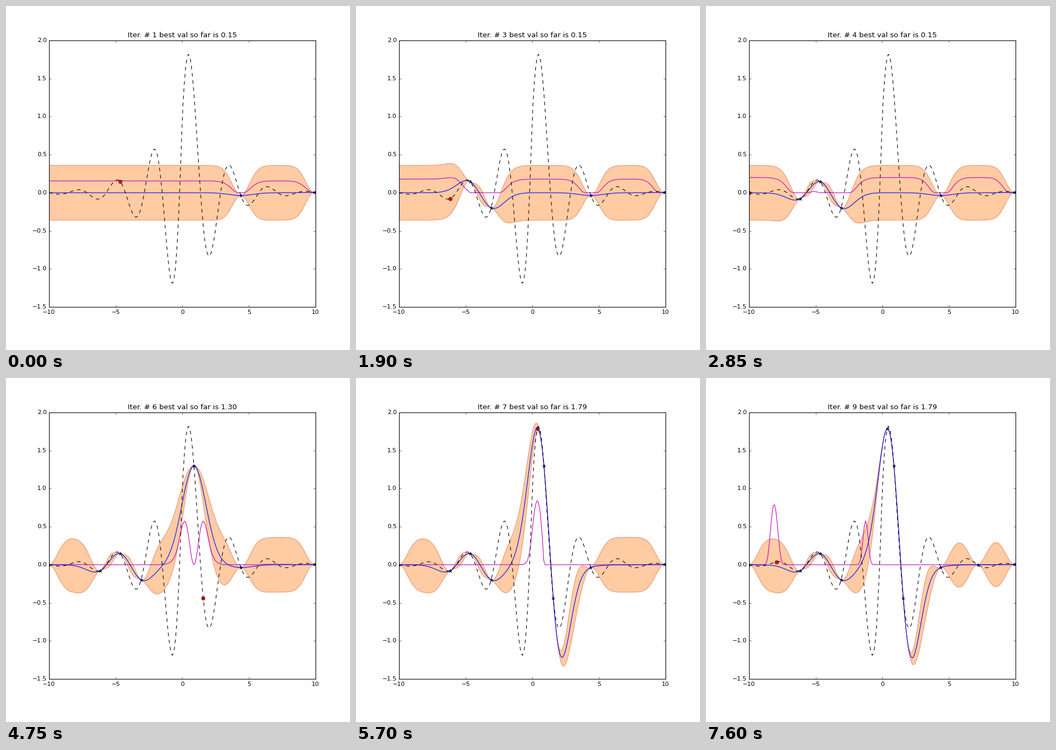
A matplotlib script for the animation above (8000 ms loop, 639x639 px).

```python
import math

import numpy as np
import matplotlib.pyplot as plt
from matplotlib.animation import FuncAnimation

SIZE, DPI = 639, 80
STEP_MS, TICK_MS, LOOP_MS = 950, 50, 8000
LENGTH, SPREAD = 0.9, 0.36

plt.style.use("classic")
plt.rcParams.update({
    "font.family": "DejaVu Sans",
    "font.size": 10,
    "figure.facecolor": "white",
    "savefig.facecolor": "white",
    "savefig.dpi": "figure",
})


def objective(x):
    r = np.abs(x)
    return 2 * np.exp(-r / 2) * np.sin(2.195 * x) + np.exp(-r) * np.cos(1.57 * x)


def kernel(a, b):
    return np.exp(-((a[:, None] - b[None, :]) ** 2) / (2 * LENGTH ** 2))


def posterior(x, known):
    """Mean and spread of the Gaussian process at x."""
    gram = kernel(known, known) + 1e-9 * np.eye(len(known))
    cross = kernel(x, known)
    gain = np.linalg.solve(gram, cross.T).T
    mean = gain @ objective(known)
    spread = SPREAD * (1 - np.sum(gain * cross, axis=1))
    return mean, np.clip(spread, 1e-6, None)


def expected_gain(mean, spread, best):
    """Expected improvement, scaled to a fixed norm."""
    z = (mean - best) / spread
    pdf = np.exp(-z ** 2 / 2) / math.sqrt(2 * math.pi)
    cdf = np.array([0.5 * math.erfc(-v / math.sqrt(2)) for v in z])
    gain = np.maximum(spread * (z * cdf + pdf), 0)
    return 2 * gain / np.linalg.norm(gain)


START = [4.39, 9.9]
PICKS = [-4.664, -3.09, -6.14, -10, 0.873, 1.573, 0.378, 7.15, -7.95]
grid = np.linspace(-10, 10, 200)


def solve_step(i):
    known = np.array(START + PICKS[:i])
    mean, spread = posterior(grid, known)
    gain = expected_gain(mean, spread, objective(known).max())
    best = objective(np.append(known, PICKS[i])).max()
    return known, mean, spread, gain, best


steps = [solve_step(i) for i in range(len(PICKS))]

fig = plt.figure(figsize=(SIZE / DPI, SIZE / DPI), dpi=DPI)
ax = fig.add_axes([0.125, 0.125, 0.775, 0.775])
band, = ax.fill([0, 0, 0], [0, 0, 0], facecolor="#FF9848",
                edgecolor="#CC4F1B", alpha=0.5)
gain_line, = ax.plot([], [], "m-")
pick_dot, = ax.plot([], [], "ro")
mean_line, = ax.plot([], [], "b-")
ax.plot(grid, objective(grid), "k--")
stars, = ax.plot([], [], "b*")
title = ax.set_title("")
ax.set_xlim(-10, 10)
ax.set_ylim(-1.5, 2)
ax.set_xticks(np.arange(-10, 11, 5))
ax.set_yticks(np.arange(-1.5, 2.1, 0.5))


def update(frame):
    i = min(frame * TICK_MS // STEP_MS, len(PICKS) - 1)
    known, mean, spread, gain, best = steps[i]
    band.set_xy(np.column_stack([
        np.concatenate([grid, grid[::-1]]),
        np.concatenate([mean - spread, (mean + spread)[::-1]]),
    ]))
    gain_line.set_data(grid, gain)
    mean_line.set_data(grid, mean)
    pick_dot.set_data([PICKS[i]], [objective(PICKS[i])])
    stars.set_data(known, objective(known))
    title.set_text(f"Iter. # {i + 1} best val so far is {best:.2f}")
    return band, gain_line, mean_line, pick_dot, stars, title


anim = FuncAnimation(fig, update, frames=LOOP_MS // TICK_MS,
                     interval=TICK_MS, repeat=True, repeat_delay=0)
plt.show()
```
